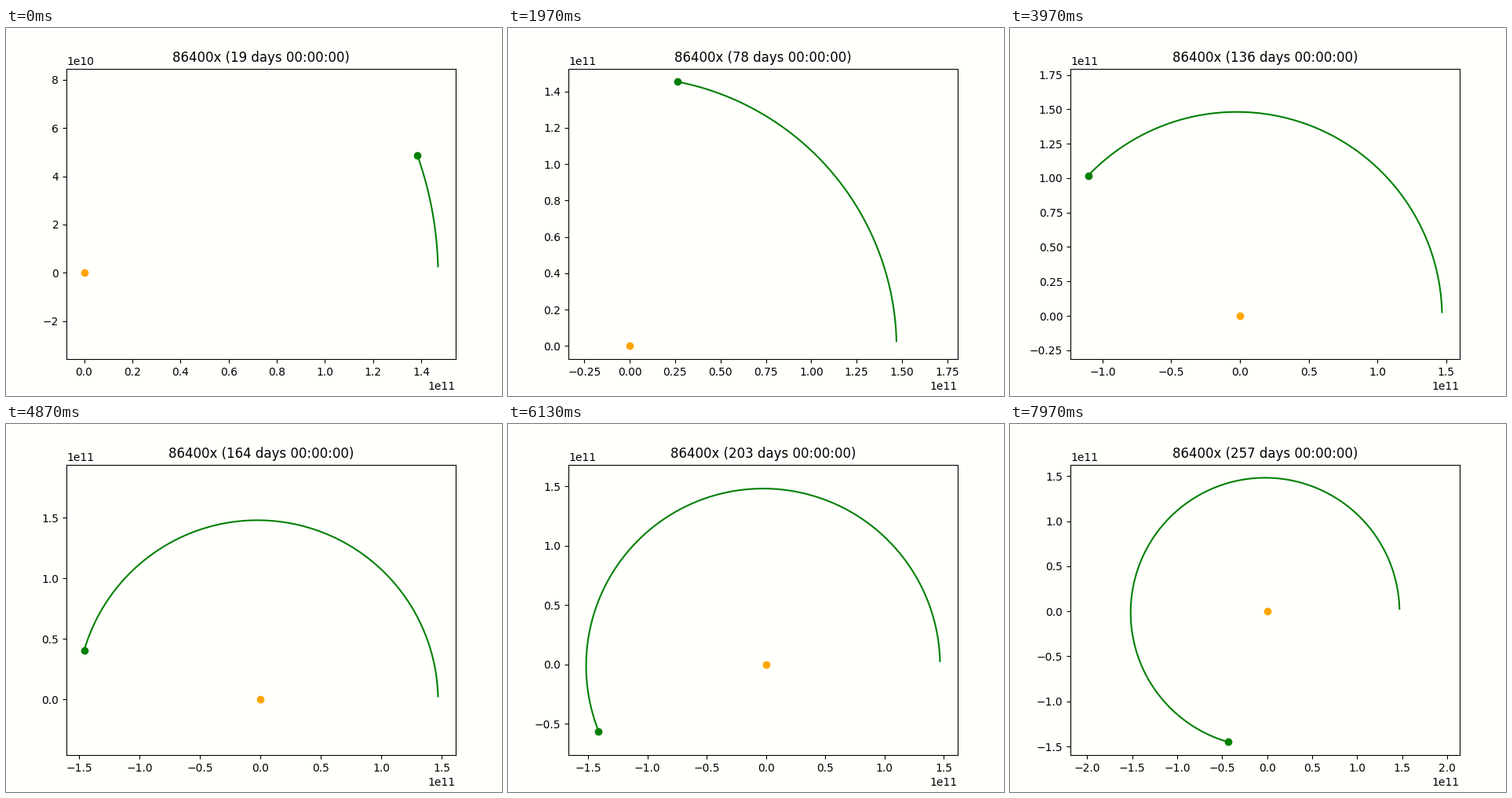
These frames come from a looping animation (632 by 468 pixels, 8 s). A matplotlib script:

```python
import numpy as np
import matplotlib.pyplot as plt
from matplotlib.animation import FuncAnimation

W, H, DPI = 632, 468, 100
FRAMES, LOOP_MS = 240, 8000
PAPER = "#fffffc"

GM = 6.674e-11 * 1.989e30
DAY = 86400.0
START = (1.47e11, 0.0)
SPEED = 30290.0

# The day counter runs at about one day per frame, with slight drift
KNOT_FRAMES = [0, 59, 93, 146, 184, 206, 239]
KNOT_DAYS = [19, 78, 110, 164, 204, 226, 257]


def orbit(days):
    """Positions after each day, by semi-implicit Euler steps."""
    pos = np.array(START)
    vel = np.array([0.0, SPEED])
    path = []
    for _ in range(days):
        vel = vel - GM * pos / np.hypot(*pos) ** 3 * DAY
        pos = pos + vel * DAY
        path.append(pos)
    return np.array(path)


path = orbit(KNOT_DAYS[-1])

fig = plt.figure(figsize=(W / DPI, H / DPI), dpi=DPI, facecolor=PAPER)
ax = fig.add_axes([77 / W, 46.8 / H, 496 / W, 369.6 / H], facecolor=PAPER)
ax.set_aspect("equal", adjustable="datalim")

ax.plot([0], [0], "o", color="orange")
trail, = ax.plot([], [], color="green")
planet, = ax.plot([], [], "o", color="green")
title = ax.set_title("")


def update(frame):
    day = int(round(np.interp(frame, KNOT_FRAMES, KNOT_DAYS)))
    x, y = path[:day].T
    trail.set_data(x, y)
    planet.set_data(x[-1:], y[-1:])
    title.set_text(f"{DAY:.0f}x ({day} days 00:00:00)")
    # Fresh limits each time, so the view depends on the day alone
    ax.relim()
    ax.autoscale(True)
    ax.autoscale_view()
    return trail, planet, title


anim = FuncAnimation(fig, update, frames=FRAMES, interval=LOOP_MS / FRAMES,
                     init_func=lambda: update(0), repeat=True,
                     repeat_delay=0, blit=False)
plt.show()
```
